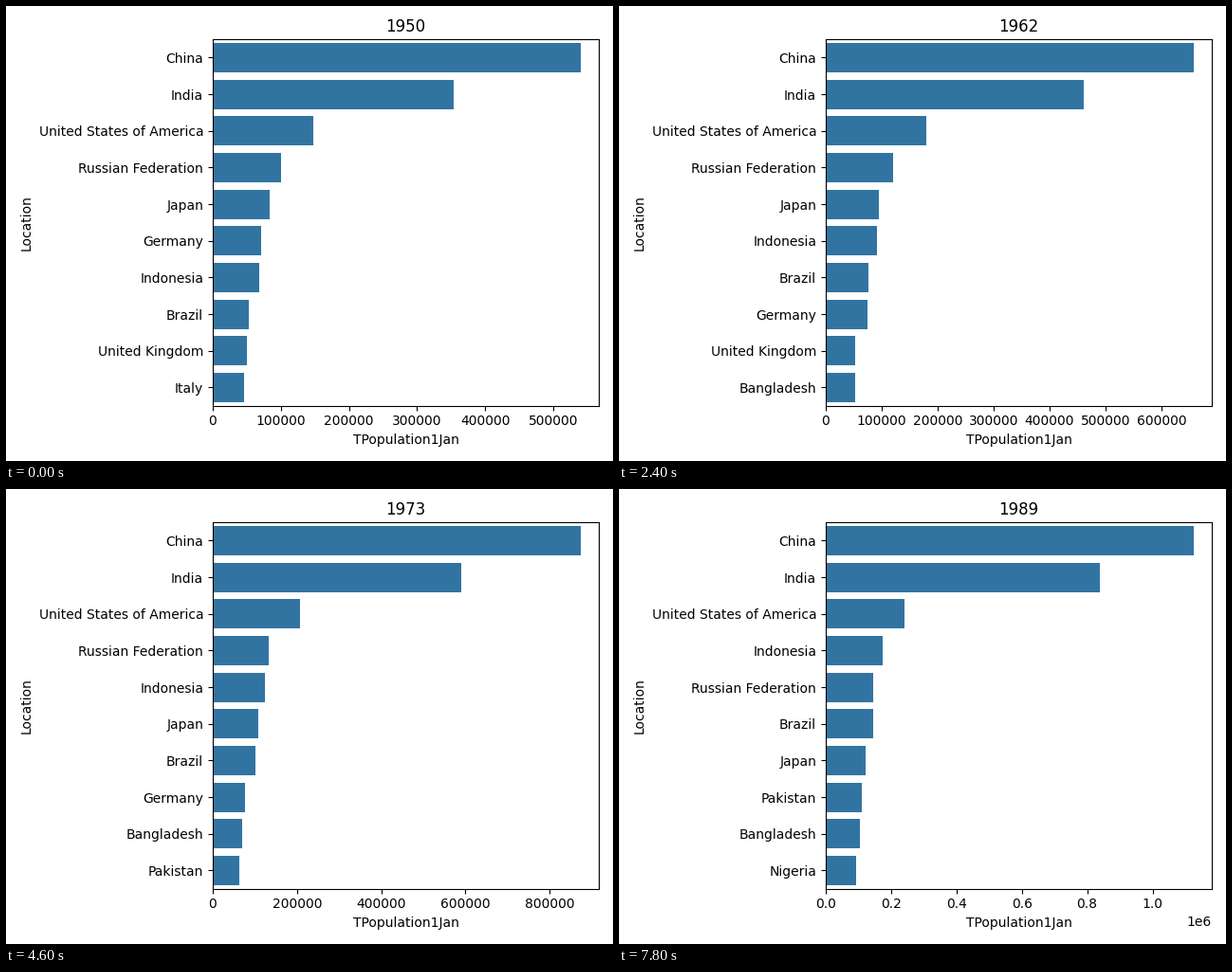
Recreate the animation shown at these times as a matplotlib script. Size 640 px wide and 480 px high, loop 8000 ms.

```python
import numpy as np
import matplotlib.pyplot as plt
from matplotlib.animation import FuncAnimation

FIRST, COUNT, TOP = 1950, 40, 10
BAR = "#3274a1"

# Millions at the start, one third, two thirds and end; a cubic joins them.
GROWTH = {
    "India": (353.4, 471.5, 630, 840.3),
    "United States of America": (147.2, 183, 212.8, 242.2),
    "Russian Federation": (101, 122.5, 134.4, 146.8),
    "Japan": (83.5, 96.4, 112.3, 122.2),
    "Germany": (70.7, 74.3, 78.6, 78.3),
    "Indonesia": (69, 94.2, 132.5, 175.8),
    "Brazil": (52.6, 78.5, 109.9, 146.4),
    "United Kingdom": (50, 53.2, 56.2, 57),
    "Italy": (46.1, 50.4, 55.3, 56.8),
    "Bangladesh": (39, 53.6, 74.5, 103.6),
    "Pakistan": (37.5, 48.6, 69.5, 109.6),
    "Nigeria": (36.8, 47.4, 64.3, 91.7),
}
# China stalls around 1960, so it runs straight between its turning points.
CHINA = {1950: 539.8, 1955: 597.3, 1959: 650.5, 1962: 657,
         1965: 715.9, 1973: 872.6, 1979: 962.6, 1989: 1125}

curves = {name: np.polyfit(range(4), points, 3) for name, points in GROWTH.items()}


def top_ten(year):
    s = 3 * (year - FIRST) / (COUNT - 1)
    pop = {name: np.polyval(curve, s) for name, curve in curves.items()}
    pop["China"] = np.interp(year, list(CHINA), list(CHINA.values()))
    ranked = sorted(pop, key=pop.get, reverse=True)[:TOP]
    return ranked, [1000 * pop[name] for name in ranked]


def fit_layout():
    # The label overhang depends on the width, so a second pass settles it.
    fig.subplots_adjust(left=0.341, right=0.977, bottom=0.121)
    for _ in range(2):
        fig.tight_layout()
    fig.subplots_adjust(top=1 - 35.13 / 480)


fig, ax = plt.subplots(figsize=(6.4, 4.8), dpi=100)


def draw(i):
    year = FIRST + i
    names, values = top_ten(year)
    ax.clear()
    ax.barh(range(TOP), values, height=0.8, color=BAR)
    ax.set_yticks(range(TOP), names)
    ax.set_ylim(TOP - 0.5, -0.5)
    ax.set(title=str(year), xlabel="TPopulation1Jan", ylabel="Location")
    fit_layout()
    return ax.patches


anim = FuncAnimation(fig, draw, frames=COUNT, interval=200, repeat=True,
                     repeat_delay=0, init_func=lambda: [])

plt.show()
```
